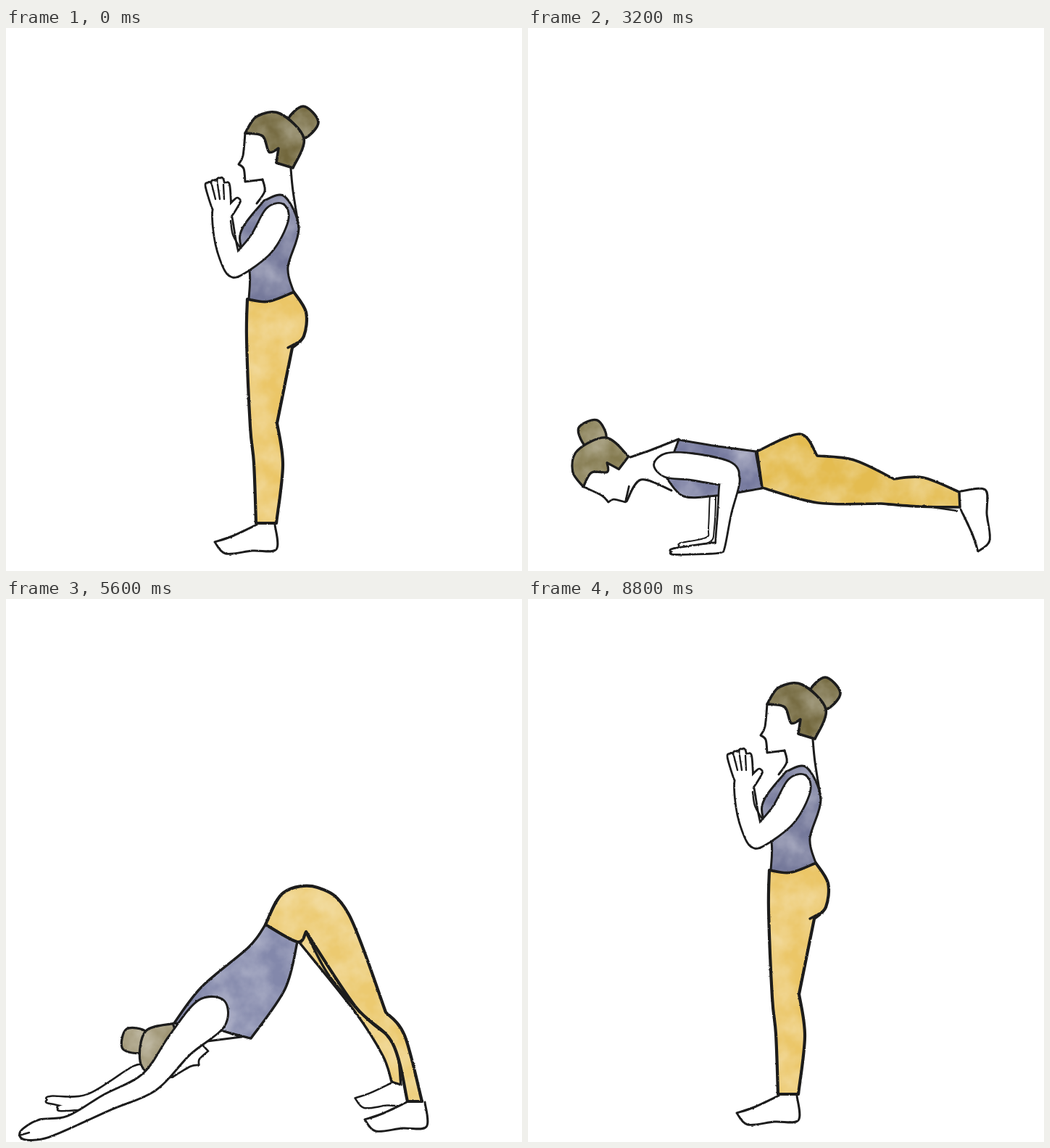
Recreate the animation shown at these times as an HTML page. Size 712 by 749 pixels, loop 9.6 s.

```html
<!DOCTYPE html>
<html lang="en">
<head>
<meta charset="utf-8">
<title>Sun salutation</title>
<style>
html, body { margin: 0; width: 100%; height: 100%; overflow: hidden; background: #fff; }
svg { display: block; width: 100%; height: 100%; }
path { stroke-linecap: round; stroke-linejoin: round; }
</style>
</head>
<body>
<svg id="stage" viewBox="0 0 712 749">
  <defs>
    <filter id="wash" x="0" y="0" width="712" height="749" filterUnits="userSpaceOnUse" color-interpolation-filters="sRGB">
      <feTurbulence type="fractalNoise" baseFrequency=".025" numOctaves="4" seed="8"/>
      <feColorMatrix values="0 0 0 0 1  0 0 0 0 1  0 0 0 0 1  .6 0 0 0 -.16"/>
      <feComposite in2="SourceAlpha" operator="in" result="light"/>
      <feMerge><feMergeNode in="SourceGraphic"/><feMergeNode in="light"/></feMerge>
    </filter>
    <filter id="rough" x="0" y="0" width="712" height="749" filterUnits="userSpaceOnUse" color-interpolation-filters="sRGB">
      <feTurbulence type="fractalNoise" baseFrequency=".3" numOctaves="2" seed="3"/>
      <feDisplacementMap in="SourceGraphic" scale="2" xChannelSelector="R" yChannelSelector="G"/>
    </filter>
  </defs>
</svg>
<script>
// A part is a kind, a line width and key points joined by a smooth curve; "|" marks a corner.
// Kinds: Y leggings, B top, H hair, W white, N line only, L limbs given as x,y,radius joints.
// A part may also be [transform, parts].
const place = (parts, [px, py], x, y, angle = 0, size = 1) =>
  [`translate(${x} ${y}) rotate(${angle}) scale(${size}) translate(${-px} ${-py})`, parts];

const head = (...at) => place([
  'H3.6 410,108 431,130 410,152 388,130 410,108',
  'H3.6 330,145 346,122 378,118 411,152 396,193 | 373,186 | 376,166 | 363,171 354,149 330,145',
  'N3 330,145 327,176 321,188 | 328,194 330,212 | 354,209'], [370, 160], ...at);

const neck = ['N3 354,209 357,225 346,242', 'N3 393,194 396,225 404,275'];

const foot = (...at) => place([
  'W3 346,685 312,701 288,709 | 303,725 340,721 373,719 371,685'], [358, 685], ...at);

const shin = '| 382,603 373,683 | 345,683 | 342,600 337,550';

const fingers = [0, 1, 2, 3].map(i => `${290 + 5 * i},248,5 ${280 + 8 * i},${218 - 3 * (i % 3)},4.5`).join(' | ');
const gaps = [0, 1, 2].map(i => `N2.4 ${284 + 8 * i},216 ${289 + 6 * i},236`);

const stand = [
  foot(358, 685),
  `Y4.2 333,374 | 362,377 397,364 | 414,392 411,425 395,441 | 374,545 ${shin} 332,430 333,374`,
  'N3.4 389,441 402,434',
  'B3 356,238 384,232 404,276 389,330 397,364 | 362,377 335,374 | 336,335 323,285 356,238',
  head(370, 160), ...neck,
  `L2.8 374,258,17 352,298,18 316,332,12 | 313,332,11 303,295,14 297,252,12 | ${fingers} | 306,256,6 319,239,4`,
  ...gaps,
  'N2.4 310,266 313,285 323,303'];

const back = [
  foot(358, 685),
  `Y4.2 322,372 | 350,380 383,366 | 402,402 385,440 | 372,550 ${shin} 325,460 322,372`,
  'N3.4 378,442 394,430',
  'B3 322,372 330,300 372,248 | 412,268 395,315 383,366 | 350,380 322,372',
  head(385, 170, 20),
  'N3 356,224 357,245 346,268',
  'L3 392,262,18 428,190,16 462,105,13 490,45,11 502,20,7'];

const fold = [
  foot(374, 669), foot(361, 686),
  'N3 277,555 275,586',
  head(312, 605, 155, .85),
  'B3 298,384 320,398 346,405 | 341,552 | 300,562 274,557 | 255,515 270,437 298,384',
  'W3 257,531 274,545 274,558 | 257,531',
  'W3 320,545 323,522 342,524 342,552',
  'Y3.8 298,383 320,345 355,331 405,370 397,445 373,548 | 389,568 371,683 | 349,681 | 353,610 341,530 346,405 | 320,398 298,383',
  'N3.2 366,378 347,406', 'N3 349,384 357,393',
  'L3 298,528,17 308,556,20 350,580,17 402,602,13 | 402,606,15 393,655,10 382,705,8 | 375,712,9 330,730,6',
  'N2.4 328,731 340,721'];

const half = [
  foot(370, 689),
  head(152, 473, -70, .92),
  'N3 191,462 212,440', 'N3 190,516 205,491 220,486',
  'B3 328,402 265,420 210,440 | 218,480 | 285,478 338,448 | 328,402',
  'Y3.8 328,402 380,384 439,430 402,562 | 400,620 383,688 | 357,686 | 358,560 366,455 | 338,448 | 328,402',
  'L3 238,466,19 258,560,13 280,650,10 298,710,9 | 294,716,7 270,725,4'];

const plank = [
  head(102, 603, -70, .92),
  'N3 141,592 170,582 208,567', 'N3 136,653 156,623 198,638',
  'L2 255,645,4 253,690,4 248,706,4 212,713,3',
  'B3 208,568 255,576 314,584 | 323,635 | 260,645 215,646 192,622 | 200,590 208,568',
  foot(597, 652, -90),
  'Y3.6 316,584 375,560 399,590 | 450,596 505,622 | 545,620 595,640 | 596,661 | 540,660 487,656 | 400,655 323,634 | 316,584',
  'N2.4 545,659 592,666',
  'L2.8 190,603,16 225,605,18 275,614,16 | 279,622,13 271,670,9 265,716,6 | 262,717,7 203,722,4'];

const cobra = [
  head(260, 447), ...[place(neck, [370, 160], 260, 447)],
  'W3 620,712 668,714 685,724 650,737 622,733',
  'B3 246,525 275,519 308,590 358,645 | 330,686 | 248,605 234,550 246,525',
  'Y3.8 358,645 408,648 422,664 | 510,690 620,712 | 622,733 | 440,726 330,686 | 358,645',
  'L3 264,545,16 262,610,16 254,680,11 252,722,10 | 250,727,8 205,732,5'];

const dog = [
  foot(541, 668, 0, .85), foot(565, 694),
  'Y3.4 405,474 482,570 520,630 532,666 | 545,670 | 535,612 490,570 414,459 | 405,474',
  'L2.6 182,655,12 115,692,9 62,691,5 | 112,696,7 76,702,4',
  head(220, 622, -126, .9),
  'B3.4 358,449 402,473 | 385,538 338,606 | 270,590 232,585 | 270,535 335,480 358,449',
  'W3 262,612 325,604 | 300,596',
  'Y4.2 358,449 383,405 430,398 473,435 524,570 | 550,602 574,693 | 554,693 | 533,612 482,562 414,459 | 402,473 358,449',
  'N3.4 414,460 444,517 488,570',
  'L3 283,572,25 240,615,19 198,666,14 140,694,11 88,721,8 50,731,13 27,738,8',
  'N2.4 18,740 32,736'];

// Colours: leggings, top, hair.
const A = ['#ebc667', '#74789a', '#72673c'], B = ['#e7bd58', '#6c7093', '#7d7146'],
      C = ['#e4bc50', '#74789d', '#857b50'], D = ['#ecca70', '#8388ab', '#9f9574'],
      E = ['#ebc768', '#8488a9', '#a89c7c'];
const steps = [
  [stand, A], [back, A], [fold, B], [half, B], [plank, C], [cobra, C],
  [plank, C, 'translate(0 -1)'], [dog, D], [half, E, 'translate(-7 -1)'],
  [fold, E, 'translate(-9 -9)'], [back, A, 'translate(-1 8)'], [stand, A]];
const STEP = 800, LOOP = STEP * steps.length;

const stage = document.getElementById('stage');
function add(parent, tag, attrs) {
  const el = document.createElementNS('http://www.w3.org/2000/svg', tag);
  for (const k in attrs) el.setAttribute(k, attrs[k]);
  return parent.appendChild(el);
}

const parse = text => text.split('|').map(run => run.trim().split(/\s+/).map(p => p.split(',').map(Number)));

// Smooth within each run, sharp between runs; a single closed run is smooth all round.
function curve(runs) {
  let last, d = 'M' + runs[0][0];
  for (const run of runs) {
    const p = last ? [last, ...run] : run, n = p.length;
    const closed = runs.length === 1 && String(p[0]) === String(p[n - 1]);
    for (let i = 0; i < n - 1; i++) {
      const b = p[i], c = p[i + 1];
      const a = p[i - 1] || (closed ? p[n - 2] : b), e = p[i + 2] || (closed ? p[1] : c);
      d += 'C' + b.map((v, k) => v + (c[k] - a[k]) / 6) + ' ' + c.map((v, k) => v - (e[k] - b[k]) / 6) + ' ' + c;
    }
    last = p[n - 1];
  }
  return d;
}

// Tapered tube with round ends through the joints.
function limb(joints) {
  const rim = (i, turn) => {
    const [x, y, r] = joints[i], a = joints[i - 1] || joints[i], b = joints[i + 1] || joints[i];
    const t = Math.atan2(b[1] - a[1], b[0] - a[0]) + turn;
    return [x + (r - 1) * Math.cos(t), y + (r - 1) * Math.sin(t)];
  };
  const ids = [...joints.keys()], end = joints.length - 1, q = Math.PI / 2;
  const pts = [...ids.map(i => rim(i, q)), rim(end, 0), ...ids.reverse().map(i => rim(i, -q)), rim(0, 2 * q)];
  return curve([[...pts, pts[0]]]);
}

function draw(g, part, fills) {
  if (Array.isArray(part)) {
    const sub = add(g, 'g', { transform: part[0] });
    return part[1].forEach(p => draw(sub, p, fills));
  }
  const cut = part.indexOf(' '), kind = part[0], width = +part.slice(1, cut);
  const runs = parse(part.slice(cut + 1)), tube = kind === 'L';
  const d = tube ? runs.map(limb).join('') : curve(runs);
  const line = { d, fill: 'none', stroke: '#1c1c1c', 'stroke-width': tube ? 2 * width : width };
  const body = { d, fill: fills[kind] };
  if (tube) add(g, 'path', line);   // joined limbs keep only their outer edge
  add(g, 'path', body);
  if (!tube) add(g, 'path', line);
}

function build([parts, [Y, B, H], transform = '']) {
  const outer = add(stage, 'g', { filter: 'url(#rough)', display: 'none' });
  const g = add(outer, 'g', { transform });
  parts.forEach(p => draw(g, p, { Y, B, H, W: '#fff', L: '#fff', N: 'none' }));
  for (const el of g.querySelectorAll('path'))
    if ([Y, B, H].includes(el.getAttribute('fill'))) el.setAttribute('filter', 'url(#wash)');
  return outer;
}

const poses = steps.map(build);
const start = performance.now();
let shown = -1;
function tick(now) {
  const i = Math.floor(Math.max(0, now - start) % LOOP / STEP);
  if (i !== shown) {
    poses.forEach((g, k) => g.setAttribute('display', k === i ? 'inline' : 'none'));
    shown = i;
  }
  requestAnimationFrame(tick);
}
tick(start);
</script>
</body>
</html>
```
